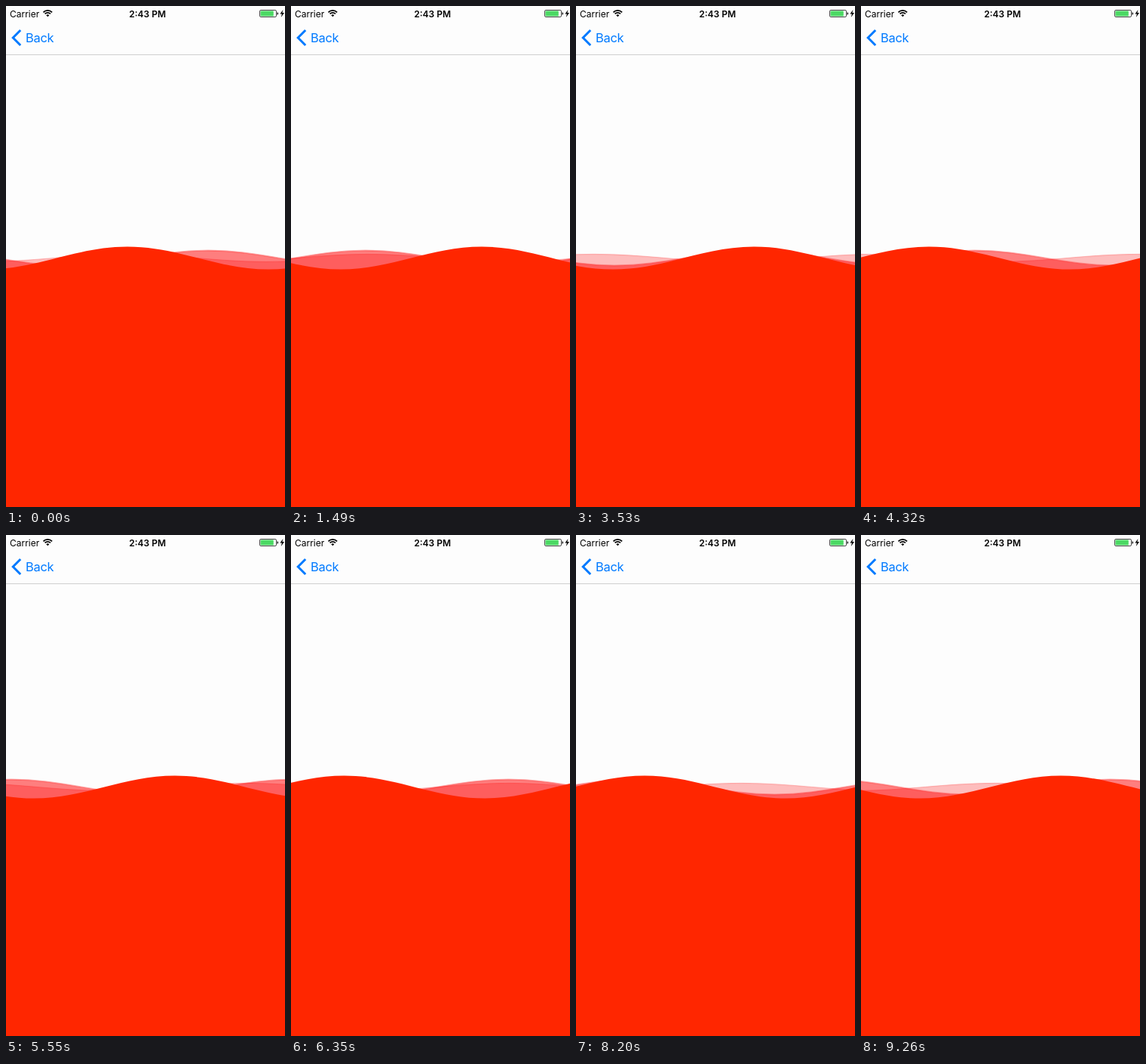
Write an HTML page without scripts that moves like this. It is 370x663 px and loops after 9.36 s.

```html
<!DOCTYPE html>
<html lang="en">
<head>
<meta charset="utf-8">
<title>Waves</title>
<style>
  html, body { margin: 0; width: 100%; height: 100%; overflow: hidden; background: #fdfdfd; }
  svg { display: block; width: 370px; height: 663px; }
  text { font-family: Inter, Roboto, sans-serif; }
  .status { font-size: 12px; }
  .time { font-weight: 600; text-anchor: middle; }
  .back { font-size: 16.5px; letter-spacing: -.3px; fill: #007aff; }

  /* All waves share one drift; --rate scales it per layer. */
  .wave { animation: drift 9360ms -3ms infinite; }
  .far  { --rate: -.2px; fill: rgba(255, 0, 0, .25); stroke: rgba(255, 0, 0, .3); }
  .mid  { --rate: -.6px; fill: rgba(255, 0, 0, .5); stroke: rgba(255, 0, 0, .55); }
  .near { --rate: -1px; fill: #ff2600; }

  @keyframes drift {
    0%      { transform: translateX(0); animation-timing-function: steps(17); }
    15.918% { transform: translateX(calc(282 * var(--rate))); animation-timing-function: steps(14); }
    29.166% { transform: translateX(calc(527 * var(--rate))); animation-timing-function: steps(18); }
    46.153% { transform: translateX(calc(819 * var(--rate))); animation-timing-function: steps(14); }
    59.294% { transform: translateX(calc(1059 * var(--rate))); animation-timing-function: steps(18); }
    76.175% { transform: translateX(calc(1366 * var(--rate))); animation-timing-function: steps(24); }
    98.931%, 100% { transform: translateX(calc(1766 * var(--rate))); animation-timing-function: steps(1); }
  }
</style>
</head>
<body>
<svg viewBox="0 0 370 663">
  <defs>
    <!-- Seven cosine periods, 374 wide, starting on a crest -->
    <path id="wave" vector-effect="non-scaling-stroke" d="M0-15c68.1 0 118.9 30 187 30
      s118.9-30 187-30 118.9 30 187 30
      s118.9-30 187-30 118.9 30 187 30
      s118.9-30 187-30 118.9 30 187 30
      s118.9-30 187-30 118.9 30 187 30
      s118.9-30 187-30 118.9 30 187 30
      s118.9-30 187-30 118.9 30 187 30
      s118.9-30 187-30v1200h-2618z"/>
  </defs>

  <rect width="370" height="663" fill="#fdfdfd"/>

  <g class="wave far"><use href="#wave" transform="translate(-216 333.5) scale(1 .3333)"/></g>
  <g class="wave mid"><use href="#wave" transform="translate(-106 333.5) scale(1 .6667)"/></g>
  <g class="wave near"><use href="#wave" transform="translate(-213 333.5)"/></g>

  <!-- Status bar -->
  <text class="status" x="5" y="14.5">Carrier</text>
  <g fill="none" stroke="#000" stroke-width="1.7">
    <path d="M49.5 8.3a8.2 8.2 0 0 1 11.6 0M51.6 10.4a5.2 5.2 0 0 1 7.4 0"/>
    <path d="M55.3 14.3l-2-2.1a2.9 2.9 0 0 1 4 0z" fill="#000" stroke="none"/>
  </g>
  <text class="status time" x="187.7" y="14.5">2:43 PM</text>
  <rect x="336.5" y="5.5" width="22" height="9" rx="1.6" fill="none" stroke="#333" stroke-width=".9"/>
  <rect x="337.5" y="6.5" width="17.3" height="7" rx=".6" fill="#4cd964"/>
  <path d="M359.5 8.3a1.7 1.7 0 0 1 0 3.4z" fill="#222"/>
  <path d="M367.4 5l-4 5.6h2.5L364.8 15l4.2-6h-2.6z"/>

  <!-- Navigation bar -->
  <path d="M19.2 32L9.3 42l9.9 10" fill="none" stroke="#007aff" stroke-width="3"/>
  <text class="back" x="26" y="48">Back</text>
  <rect y="64" width="370" height="1" fill="#cfcfcf"/>
</svg>
</body>
</html>
```
